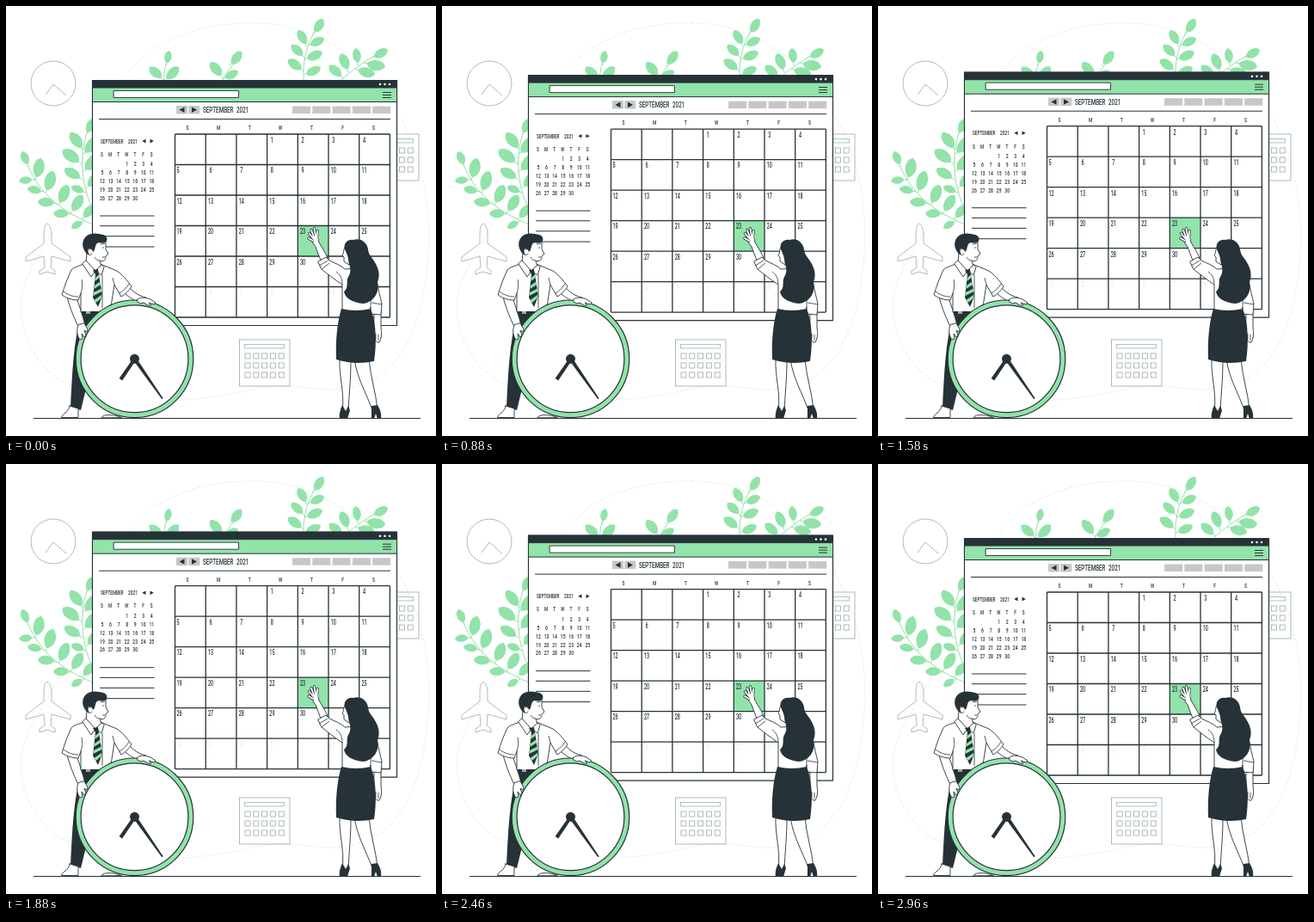
Animation of 500x500 px, one loop 3 s. Source, as an HTML page:

```html
<!DOCTYPE html>
<html lang="en">
<head>
<meta charset="utf-8">
<style>
html, body { margin: 0; width: 100%; height: 100%; overflow: hidden; background: #fff; }
svg { display: block; width: 500px; height: 500px; }
text { font-family: Roboto, "Liberation Sans", sans-serif; font-weight: 500; fill: #263238; word-spacing: 3px; }
.line { fill: none; stroke: #263238; }
.body { fill: #fff; stroke: #263238; stroke-width: .9; stroke-linejoin: round; stroke-linecap: round; }
.dark { fill: #263238; }
.green { fill: #92e3a9; }
.faint { fill: none; stroke: #9aaaa4; stroke-width: .8; }
</style>
</head>
<body>
<svg id="stage" viewBox="0 0 500 500"></svg>
<script>
const INK = '#263238', GREEN = '#92e3a9';
const path = (d, cls = 'line', extra = '') => `<path d="${d}" class="${cls}" ${extra}/>`;
const rect = (x, y, w, h, cls, extra = '') =>
  `<rect x="${x}" y="${y}" width="${w}" height="${h}" class="${cls}" ${extra}/>`;
const circle = (x, y, r, cls, extra = '') => `<circle cx="${x}" cy="${y}" r="${r}" class="${cls}" ${extra}/>`;
const range = (n, f) => Array.from({ length: n }, (_, i) => f(i)).join('');

// All lettering shares one condensed face
const text = (x, y, s, size, anchor = 'middle', extra = '') =>
  `<text transform="translate(${x} ${y}) scale(.66 1)" font-size="${size}" text-anchor="${anchor}" ${extra}>${s}</text>`;

// White limb with an ink outline
const limb = (d, w) => [[w + 1.5, INK], [w, '#fff']].map(([width, color]) =>
  path(d, '', `fill="none" stroke="${color}" stroke-width="${width}" stroke-linecap="round" stroke-linejoin="round"`)).join('');

// Slim blade on a short stalk, from the stem to its tip
function leaf([x, y, tx, ty]) {
  const dx = tx - x, dy = ty - y;
  const at = (a, b) => `${x + dx * a - dy * b} ${y + dy * a + dx * b}`;
  const base = at(.14, 0);
  return path(`M${x} ${y}L${base}`, '', `stroke="${GREEN}"`) +
    path(`M${base}C${at(.3, .32)} ${at(.8, .33)} ${tx} ${ty}C${at(.9, -.3)} ${at(.35, -.32)} ${base}`, 'green');
}
const sprig = (stem, leaves) =>
  path(stem, '', `fill="none" stroke="${GREEN}" stroke-width="1"`) + leaves.map(leaf).join('');

function plants() {
  return sprig('M184 95Q182 80 187 64', [
    [186, 69, 190, 52], [183, 86, 167, 71], [184, 87, 201, 71]]) +
  sprig('M249 92Q256 76 268 64', [
    [260, 70, 274, 53], [252, 84, 238, 65], [252, 85, 270, 76]]) +
  sprig('M347 92C344 72 347 48 360 28', [
    [357, 33, 369, 15], [350, 47, 340, 28], [351, 46, 370, 38], [347, 60, 332, 45],
    [347, 62, 368, 54], [346, 76, 328, 62], [346, 80, 366, 72]]) +
  sprig('M384 92Q402 73 430 57', [
    [425, 60, 444, 51], [409, 69, 407, 49], [416, 66, 441, 71],
    [398, 77, 390, 55], [406, 73, 429, 80], [392, 84, 376, 69]]) +
  sprig('M103 240C88 214 84 174 95 145', [
    [93, 150, 102, 131], [90, 168, 75, 147], [89, 173, 108, 153], [88, 184, 66, 167],
    [89, 193, 109, 173], [89, 202, 68, 189], [93, 212, 108, 195], [93, 217, 76, 210]]) +
  sprig('M106 256C71 242 42 224 25 185', [
    [26, 187, 19, 169], [34, 203, 41, 177], [33, 202, 15, 203], [46, 218, 55, 192],
    [44, 216, 25, 212], [61, 232, 72, 208], [59, 230, 37, 227], [75, 241, 89, 220],
    [76, 242, 55, 241], [88, 248, 102, 232], [91, 250, 76, 258]]);
}

function backdrop() {
  const card = rect(271.5, 388, 58.5, 54, 'faint') +
    rect(277.5, 393.5, 46, 4.5, 'faint', 'style="stroke:#8fbd9f"') +
    range(15, i => rect(278 + i % 5 * 9.8, 404 + (i / 5 | 0) * 11, 6, 6, 'faint'));
  return path('M290 20C365 20 421 64 457 128C486 178 496 242 490 300C485 354 470 415 420 438C372 458 342 433 290 445C205 466 130 461 80 443C36 426 13 380 18 338C24 300 64 258 82 202C101 135 126 83 175 48C210 27 250 19 290 20Z',
      '', 'fill="none" stroke="#d9eae1" stroke-width=".7" stroke-dasharray="4 2"') +
    circle(55, 90, 26, 'faint') + path('M46 103L55 91L70 104', 'faint') +
    path('M48 253C45 254 44 260 44 266V276L23 292V297L44 291L45 304L39 308V312L48 309L57 312V308L52 304L53 291L75 297V292L53 276V266C53 260 51 254 48 253Z', 'faint') +
    card + `<g transform="translate(150 -239)">${card}</g>` + plants();
}

function calendar() {
  const left = 196.5, top = 149, col = 35.7, row = 35.5;
  let s = rect(100.5, 86.5, 354, 285, 'body', 'style="stroke-width:1.2"') +
    rect(100.5, 95, 354, 16.5, 'green', `stroke="${INK}"`) + rect(100, 86, 355, 9, 'dark') +
    range(3, i => circle(435 + i * 5.5, 91, 1.3, '', 'fill="#fff"')) +
    rect(125.5, 98.5, 145, 8, 'body') +
    path('M438 100.5h10m-10 3h10m-10 3h10') +
    range(2, i => rect(198 + i * 14.3, 116, 13, 9.5, '', 'fill="#c7c7c7"')) +
    path('M207.5 117.5v6.6l-6-3.3zM216 117.5v6.6l6-3.3z', 'dark') +
    text(229, 124.3, 'SEPTEMBER 2021', 9.5, 'start') +
    range(5, i => rect(333 + i * 23.3, 116.5, 21, 8.5, '', 'fill="#c7c7c7"')) +
    path('M108 131.5H447');

  s += text(110, 159.6, 'SEPTEMBER', 7.1, 'start') + text(142, 159.6, '2021', 7.4, 'start') +
    path('M162.5 154.8v4.6l-4.3-2.3zM167.5 154.8v4.6l4.3-2.3z', 'dark');
  [...'SMTWTFS'].forEach((day, i) => {
    s += text(111.5 + i * 9.6, 174.8, day, 7.2) + text(211 + i * 36.1, 144, day, 7.5);
  });
  s += path('M109 244h63.5m-63.5 11.7h63.5m-63.5 12h63.5m-63.5 12.3h63.5');

  s += rect(left + 4 * col, top + 3 * row, col, row, 'green') +
    path(range(8, i => `M${left + i * col} ${top}v${6 * row}`) +
      range(7, i => `M${left} ${top + i * row}h${7 * col}`), 'line', 'stroke-width="1.3"');
  for (let day = 1; day <= 39; day++) {
    const cell = day + 2, c = cell % 7, r = cell / 7 | 0;
    const x = left + c * col + (c ? 5.8 : day < 10 ? 3.5 : 5);
    const next = day > 30;
    s += text(x, top + r * row + 9.8, next ? day - 30 : day, 8.2, 'middle', next ? 'style="fill:#eee"' : '');
    if (!next) s += text(112 + c * 9.55, 186.4 + r * 9.85, day, 7.7);
  }
  return s;
}

function man() {
  return path('M88 357L110 357L104 400L87 470L75 466C77 430 78 390 88 357Z', 'dark') +
    path('M74 465L84 468L84 478.5H64.5C65 474 73 473 74 465Z', 'body') +
    path('M111 478.5C113 474 126 475 134 478.5Z', 'body') +
    // Arms and shirt
    path('M70 334C73 348 78 360 84 373L92 371C89 359 85 349 82 338Z', 'body') +
    path('M133 330C143 339 151 344 159 346L163 339C153 337 146 331 140 323Z', 'body') +
    path('M92 299C85 303 79 303 76 307C72 315 68 326 65 336C71 340 77 342 84 342L87 334L87 356H121L126 324L134 338C139 335 143 331 146 326C140 318 135 312 129 308L112 301Z', 'body') +
    path('M87 334C89 328 89 323 88 318M126 324L124 316M67 332C72 336 78 338 84 338M132 334C137 331 141 327 143 323M112 313v38', 'line', 'stroke-width=".8"') +
    rect(88, 355, 23, 3.2, 'dark') + rect(93, 355, 5, 3, '', 'fill="#a6a6a6"') +
    // Head
    path('M94 286L93 299L104 308L111 303L109 296C114 298 116 295 116 291L119 288L116 283L116 273L98 272Z', 'body') +
    path('M109 296C106 296 104 294 103 292M112 281h2m-4-4l5-1M112 292h3', 'line', 'stroke-width=".8"') +
    path('M95 289C89 284 87 275 92 269C98 262 108 265 113 266C118 267 119 273 115 275C111 277 107 273 105 277C103 281 104 284 101 286C100 281 95 281 95 285C95 287 96 288 97 290Z', 'dark') +
    path('M99 283C96 281 94 285 96 288C97 290 99 290 100 288', 'body') +
    path('M93 296L104 308L99 315L89 300ZM111 301L104 308L111 313L114 304Z', 'body') +
    // Tie
    path('M101 307L107 306L108 312L112 337L107 350L101 339L104 312Z', 'dark') +
    path('M103.8 316L108 312.5L108.6 316L103.3 320ZM102.9 325L109.5 320.5L110.2 324L102.4 329ZM101.9 333L111 328.5L111.4 332L101.5 337ZM102.5 342L111.6 335.5L110.6 340L104.7 345Z', 'green');
}

function clock() {
  const x = 149.5, y = 410.3;
  return circle(x, y, 68.3, 'green', `stroke="${INK}" stroke-width="1.2"`) +
    circle(x, y, 62.4, 'body', 'style="stroke-width:1.2"') + circle(x, y, 5.5, 'dark') +
    path(`M${x - 2} ${y}L131.6 433L135.2 435.4L${x + 2} ${y + 1}Z`, 'dark') +
    path(`M${x - 2} ${y + 1}L181.3 457.3L182.7 456.3L${x + 2} ${y - 1}Z`, 'dark') +
    // Hands holding the rim
    path('M84 371C82 376 82 383 86 388L89 387L88 381L91 385L93 383L91 377L94 379L95 376L91 369Z', 'body') +
    path('M153 341C157 338 163 339 168 341L174 345L172 347L166 345L169 348L165 348L160 345L157 346L153 344Z', 'body');
}

function woman() {
  return path('M388 410C387 432 394 449 391 471L398 472C399 450 401 434 401 411Z', 'body') +
    path('M405 411C409 435 419 450 426 470L432 469C430 449 424 432 422 411Z', 'body') +
    path('M391 464C389 469 387 474 388 480H397L400 470L398 465L395 471ZM425 465L432 464C435 469 437 474 436 480H432L430 474L428 480H425L425 471Z', 'dark') +
    // Lowered arm
    path('M428 358C428 369 427 377 429 383C429 389 431 392 434 391C437 386 437 380 436 374L436 356Z', 'body') +
    path('M430 381v6m3-5v7', 'line', 'stroke-width=".8"') +
    // Raised hand and arm
    path('M354 269C355 274 358 277 360 280L366 296L374 293C371 286 367 280 364 275L362 267Z', 'body') +
    limb('M357 270L352.5 264.5M358 269L355 260.5M360 268L358.5 259M361.5 269L362 261.5M357 273L352 270', 1.8) +
    path('M356 268L362 267L363 274L359 276Z', '', 'fill="#fff"') +
    path('M363 297L372 292L376 296C382 299 389 301 394 306L424 304C431 315 433 331 437 346L436 359L424 358L424 350L423 355H391L391 324C382 318 373 311 367 306Z', 'body') +
    path('M364 302L374 296M367 306L376 299M391 324C391 316 388 312 384 309M425 345L437 347M424 350L424 337', 'line', 'stroke-width=".8"') +
    // Head and hair
    path('M397 277C391 281 394 286 391 290L393 292L393 297L399 301Z', 'body') +
    path('M394 283C392 275 398 271 404 272C411 269 420 274 421 283C422 291 426 292 430 300C435 309 434 316 432 321C435 333 427 345 415 346C404 345 394 340 393 332C399 328 395 320 398 315C402 309 400 304 399 299C398 293 397 289 394 283Z', 'dark') +
    path('M390 352Q407 356 424 352C431 369 431 394 428 413Q406 418 384 411C383 390 385 368 390 352Z', 'dark');
}

document.getElementById('stage').innerHTML = backdrop() +
  `<g id="window">${calendar()}</g>` + path('M32 479.5H482') + man() + clock() + woman();

// The window rises and sinks at constant speed, on 72 steps per loop
const panel = document.getElementById('window');
const start = performance.now();
function draw() {
  const t = (performance.now() - start) % 3000;
  const p = Math.min(71, Math.floor(t * .024 + .1)) / 71;
  const rise = 10 * (1 - Math.abs(1 - 2 * p));
  panel.setAttribute('transform', `translate(0 ${-rise})`);
  requestAnimationFrame(draw);
}
draw();
</script>
</body>
</html>
```
